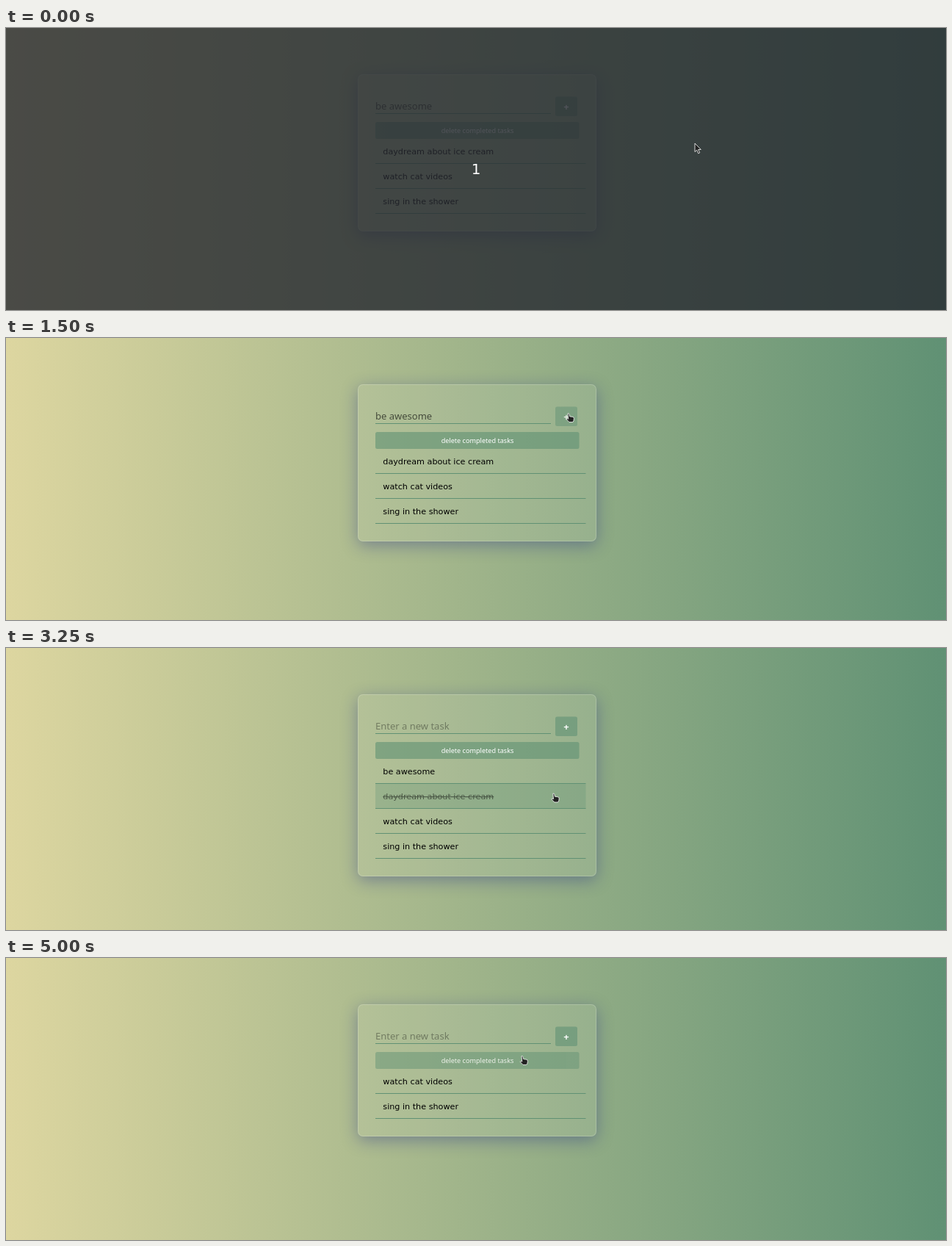
Write an HTML page that moves like this. It is 1280 px wide and 384 px high and loops after 6000 ms.

```html
<!DOCTYPE html>
<html lang="en">
<head>
<meta charset="utf-8">
<title>To-do list</title>
<style>
  html, body { margin: 0; width: 100%; height: 100%; overflow: hidden; }
  #stage { position: relative; width: 1280px; height: 384px; overflow: hidden;
    background: linear-gradient(to right, #ddd6a0, #609174); }
  #card { position: absolute; left: 479px; top: 63px; width: 325px; box-sizing: border-box;
    border: 1px solid rgba(255,255,255,.18); border-radius: 7px;
    background: rgba(255,255,255,.08); box-shadow: 0 5.6px 22.4px rgba(31,38,135,.37); }
  svg { position: absolute; left: 0; top: 0; }
  text { font-family: "Noto Sans", sans-serif; }
  .task text { font: 11.2px "DejaVu Sans", sans-serif; }
  .task rect { fill: #609174; fill-opacity: 0; }
  .task.hover rect { fill-opacity: .3; }
  .task.done text { opacity: .5; text-decoration: line-through; }
  .line { stroke: #609174; }
  .button rect { fill: #609174; fill-opacity: .6; }
  .button text { fill: #fff; text-anchor: middle; }
  .button.hover { opacity: .8; }
  .cursor { fill: #222; stroke: #fff; stroke-width: .8; stroke-linejoin: round; }
</style>
</head>
<body>
<div id="stage">
  <div id="card"></div>
  <svg width="1280" height="384">
    <text id="input" x="503" y="111.4" font-size="13"></text>
    <path class="line" d="M503 116.5H742"/>
    <g id="add" class="button">
      <rect x="748" y="93.5" width="30" height="26.5" rx="2.5"/>
      <text x="763" y="111.7" font-size="13" font-weight="700">+</text>
    </g>
    <g id="clear" class="button">
      <rect x="503" y="128" width="277.5" height="23" rx="2.5"/>
      <text x="642" y="143" font-size="9.1">delete completed tasks</text>
    </g>
    <g id="tasks"></g>
    <g id="intro">
      <rect width="1280" height="384" fill="rgb(38,41,48)" fill-opacity=".8"/>
      <text x="640" y="199" fill="#fff" text-anchor="middle"
        style="font: 20px 'DejaVu Sans', sans-serif">1</text>
    </g>
    <path id="arrow" class="cursor" d="M0 0V11.6L2.7 9.2L4.7 13.8L6.7 12.9L4.7 8.5H8.3Z"/>
    <path id="hand" class="cursor" d="M0 0q1.6-.6 2 1l.6 3 4 .6q2 .4 1.8 2.2l-.4 3q-.4 2-2 2h-4l-3.5-3.5q-.8-1.4.8-1.4l1.4.6z"/>
  </svg>
</div>
<script>
const $ = id => document.getElementById(id);
const LOOP = 6000, ROW = 34;
const tasks = ["be awesome", "daydream about ice cream", "watch cat videos", "sing in the shower"];

// [start ms, cursor shape, tip x, tip y, hovered element]
const moves = [
  [0, "arrow", 938, 157], [500, "arrow", 935, 160], [750, "arrow", 813, 140],
  [1000, "arrow", 772, 121], [1250, "hand", 764, 103.6, "add"], [1500, "hand", 765, 102.8, "add"],
  [2250, "hand", 768, 116, "add"], [2500, "hand", 751, 199, "task1"], [2750, "hand", 743.5, 201.6, "task1"],
  [3250, "hand", 744.8, 198.2, "task1"], [3500, "hand", 730, 163, "task0"],
  [4250, "hand", 700, 128, "clear"], [4500, "hand", 701, 131.6, "clear"], [4750, "hand", 702, 133.6, "clear"]
];
const ADDED = 1750, DONE = [4000, 3250], CLEARED = 5000;

$("tasks").innerHTML = tasks.map((name, i) => `<g id="task${i}" class="task">
  <rect x="503" y="151" width="286.5" height="34"/>
  <text x="513.3" y="172">${name}</text>
  <path class="line" d="M503 185H789.5" transform="translate(0 -.5)"/></g>`).join("");

function show(el, visible) { el.style.display = visible ? "" : "none"; }

function draw(t) {
  const [, shape, x, y, hovered] = moves.findLast(move => move[0] <= t);
  const added = t >= ADDED;
  const first = t >= CLEARED ? 2 : added ? 0 : 1;

  $("input").textContent = added ? "Enter a new task" : tasks[0];
  $("input").setAttribute("fill-opacity", added ? .35 : .6);
  $("card").style.height = 146 + ROW * (tasks.length - first) - 34 + "px";
  tasks.forEach((_, i) => {
    const row = $("task" + i);
    show(row, i >= first);
    row.setAttribute("transform", `translate(0 ${ROW * (i - first)})`);
    row.classList.toggle("done", t >= DONE[i]);
  });
  for (const id of ["add", "clear", "task0", "task1"]) $(id).classList.toggle("hover", id === hovered);
  for (const id of ["arrow", "hand"]) show($(id), id === shape);
  $(shape).setAttribute("transform", `translate(${x} ${y})`);
  show($("intro"), t < 250);
}

const start = performance.now();
function tick() {
  draw((performance.now() - start) % LOOP);
  requestAnimationFrame(tick);
}
tick();
</script>
</body>
</html>
```
